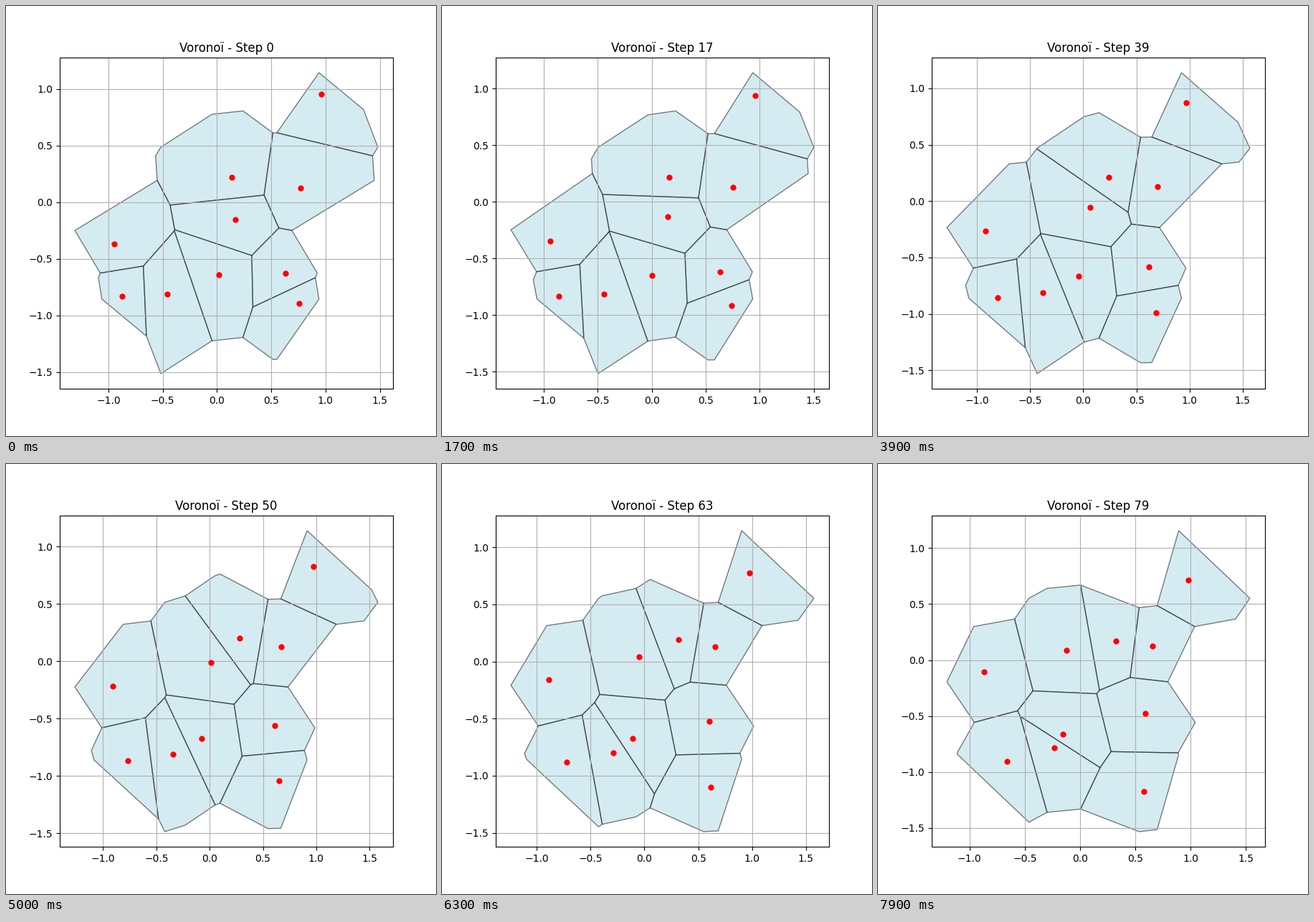
These frames come from a looping animation (600 px wide and 600 px high, 8000 ms). A matplotlib script:

```python
import itertools

import numpy as np
import matplotlib.pyplot as plt
from matplotlib.animation import FuncAnimation

STEPS = 80
PERIOD = 2.0  # the plane is a torus of this side

# Where each site rests at first, passes at half time and ends up.
TRACKS = np.array([
    [(.958, .955), (.969, .868), (.982, .708)],
    [(.133, .220), (.243, .209), (.326, .167)],
    [(.767, .126), (.697, .128), (.660, .125)],
    [(.171, -.153), (.061, -.051), (-.125, .089)],
    [(-.945, -.368), (-.920, -.261), (-.868, -.104)],
    [(-.873, -.832), (-.802, -.856), (-.655, -.906)],
    [(-.461, -.813), (-.378, -.811), (-.227, -.782)],
    [(.014, -.643), (-.045, -.666), (-.157, -.662)],
    [(.634, -.629), (.618, -.581), (.591, -.473)],
    [(.754, -.896), (.682, -.994), (.577, -1.175)],
])
START, HALF, END = TRACKS.transpose(1, 0, 2)

SHIFTS = PERIOD * np.array(list(itertools.product((-1, 0, 1), repeat=2)))
SQUARE = PERIOD * np.array([[-1, -1], [1, -1], [1, 1], [-1, 1]])


def sites_at(step):
    """Cubic motion from rest through the half-way and end positions."""
    t = step / STEPS
    return START + t * t * (8 * (1 - t) * (HALF - START) + (2 * t - 1) * (END - START))


def clip(poly, normal, offset):
    """Keep the part of a convex polygon where normal . p <= offset."""
    side = poly @ normal - offset
    if side.max() <= 0:
        return poly
    out = []
    for i in range(len(poly)):
        a, b = side[i - 1], side[i]
        if (a <= 0) != (b <= 0):
            out.append(poly[i - 1] + (poly[i] - poly[i - 1]) * a / (a - b))
        if b <= 0:
            out.append(poly[i])
    return np.array(out)


def cell(site, images):
    """Voronoi cell of a site among all periodic images."""
    rel = images - site
    dist = (rel ** 2).sum(axis=1)
    poly = SQUARE
    for k in np.argsort(dist):
        if dist[k] > 1e-12:
            poly = clip(poly, rel[k], dist[k] / 2)
    return poly + site


fig, ax = plt.subplots(figsize=(6, 6), dpi=100)
cells = [ax.fill(*SQUARE.T, facecolor="lightblue", edgecolor="black", alpha=0.5)[0]
         for _ in START]
dots, = ax.plot([], [], "ro", markersize=5)
ax.grid(True)


def update(step):
    sites = sites_at(step)
    images = (sites[:, None] + SHIFTS).reshape(-1, 2)
    for patch, site in zip(cells, sites):
        patch.set_xy(cell(site, images))
    dots.set_data(*sites.T)
    ax.set_title(f"Voronoï - Step {step}")
    ax.relim()
    ax.autoscale_view()
    return [*cells, dots]


anim = FuncAnimation(fig, update, frames=STEPS, interval=100,
                     repeat=True, repeat_delay=0, blit=False)
plt.show()
```
